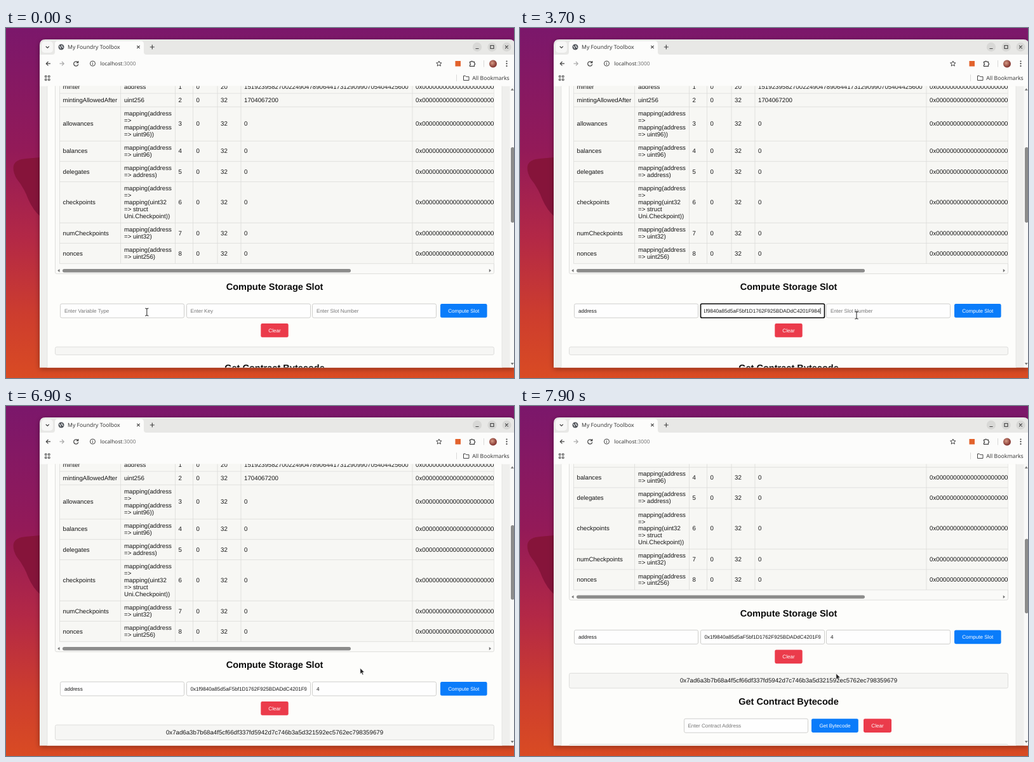
An HTML page that plays this animation: 800 px wide and 552 px high, repeating every 8000 ms.

```html
<!DOCTYPE html>
<html lang="en">
<head>
<meta charset="utf-8">
<title>Compute Storage Slot</title>
<style>
  html, body { margin: 0; width: 100%; height: 100%; overflow: hidden; background: #9c1c52; }
  svg { display: block; width: 800px; height: 552px; }
  text { font-family: "Liberation Sans", Arial, sans-serif; font-size: 9.7px; fill: #161616; white-space: pre; text-rendering: geometricPrecision; }
  .ui { font-family: "Noto Sans", "Open Sans", sans-serif; font-size: 8.7px; fill: #3a3a3a; }
  .head { font-weight: bold; font-size: 14.55px; text-anchor: middle; fill: #0c0c0c; }
  .small { font-size: 8.1px; }
  .hint { fill: #757575; }
  .label { fill: #fff; text-anchor: middle; }
  .mid { text-anchor: middle; }
  .icon { fill: none; stroke: #444; stroke-width: 1.2; }
  .rule { stroke: #dcdcda; stroke-width: .8; }
</style>
</head>
<body>
<svg id="stage" viewBox="0 0 800 552">
  <defs>
    <linearGradient id="desk" x2="0" y2="1">
      <stop offset="0" stop-color="#7b176b"/>
      <stop offset=".35" stop-color="#931a58"/>
      <stop offset=".6" stop-color="#b32846"/>
      <stop offset=".82" stop-color="#cd3d2e"/>
      <stop offset="1" stop-color="#d94b23"/>
    </linearGradient>
    <radialGradient id="photo" cx=".4" cy=".4">
      <stop offset="0" stop-color="#d79a84"/>
      <stop offset="1" stop-color="#8a3f38"/>
    </radialGradient>
    <filter id="shade" x="-10%" y="-10%" width="120%" height="120%">
      <feDropShadow dx="0" dy="2" stdDeviation="4" flood-opacity=".35"/>
    </filter>
    <clipPath id="view"><rect x="53" y="91.5" width="748" height="444"/></clipPath>
    <clipPath id="cells"><rect x="78" y="60" width="690.5" height="330"/></clipPath>
    <clipPath id="keyBox"><rect x="290" y="436" width="183.6" height="20"/></clipPath>
  </defs>

  <rect width="800" height="552" fill="url(#desk)"/>
  <path d="M12 217Q15 207 32 206L54 204V297Q43 288 35 270Q28 251 17 238Q10 226 12 217Z" fill="#86143a"/>

  <!-- browser window -->
  <path d="M53 535V27Q53 18 62 18H793Q801 18 801 26V535.5H53Z" fill="#e8e8e6" filter="url(#shade)"/>
  <rect x="56" y="21" width="18" height="18" rx="5" fill="#f7f7f6"/>
  <path d="M62.8 29L65.3 31.5L67.8 29" class="icon"/>
  <path d="M73 42Q77 42 77 38V25Q77 20.500 81.500 20.500H212Q217 20.500 217 25V38Q217 42 221 42H801V92H53V42Z" fill="#fcfcfb"/>
  <circle cx="87" cy="30" r="4.500" fill="#50545a"/>
  <path d="M84 28.500Q86 30 86 32.500M88 27Q87 29.500 90 31" stroke="#fff" stroke-width="1.100" fill="none"/>
  <text x="97" y="33.200" class="ui">My Foundry Toolbox</text>
  <path d="M206.300 27.800L210.700 32.200M210.700 27.800L206.300 32.200M226.800 30H233.800M230.300 26.500V33.500" class="icon"/>
  <g fill="#d8d8d6"><circle cx="742" cy="30" r="7.200"/><circle cx="765.500" cy="30" r="7.200"/><circle cx="788.500" cy="30" r="7.200"/></g>
  <path d="M739.500 32.500H744.500M763 27.500H768V32.500H763ZM786.200 27.700L790.800 32.300M790.800 27.700L786.200 32.300" class="icon"/>
  <path d="M70 56.200H63.300M66.500 53L63.300 56.200L66.500 59.400" class="icon"/>
  <path d="M84.500 56.200H91.200M88 53L91.200 56.200L88 59.400" class="icon" style="stroke:#aaa"/>
  <path d="M113 54A3.600 3.600 0 1 0 113.800 57.200M113.800 52V54.800H111" class="icon"/>
  <circle cx="136.500" cy="56" r="4" class="icon" style="stroke-width:1"/>
  <path d="M136.500 55.500V58.300M136.500 53.600V54.600" class="icon" style="stroke-width:1"/>
  <text x="148.300" y="59.200" class="ui" style="font-size:8.300px">localhost<tspan fill="#777">:3000</tspan></text>
  <path d="M681.800 52L683 54.800L686 55L683.700 57L684.400 60L681.800 58.400L679.200 60L679.900 57L677.600 55L680.600 54.800Z" class="icon" style="stroke-width:1"/>
  <rect x="707.500" y="52" width="8.500" height="8.500" fill="#e2622c"/>
  <path d="M730.500 53.300H732.500Q733.500 50.800 735 53.300H737.500V55.500Q740 56.500 737.500 58V60.300H730.500V58Q733 57 730.500 55.500Z" class="icon"/>
  <path d="M752.500 51V61.500M709.500 73.500V84" stroke="#d9d9d8"/>
  <circle cx="767" cy="56.500" r="6" fill="url(#photo)"/>
  <g fill="#444"><circle cx="788.500" cy="52.500" r="1.100"/><circle cx="788.500" cy="56.200" r="1.100"/><circle cx="788.500" cy="59.900" r="1.100"/></g>
  <path d="M61.500 75.200H64V77.700H61.500ZM66.500 75.200H69V77.700H66.500ZM61.500 80.200H64V82.700H61.500ZM66.500 80.200H69V82.700H66.500Z" class="icon" style="stroke-width:1"/>
  <path d="M720.500 82.500V75.500H723.500L724.700 76.800H729V82.500Z" class="icon" style="stroke-width:1"/>
  <text x="734.300" y="82" class="ui">All Bookmarks</text>

  <!-- page -->
  <g clip-path="url(#view)">
    <rect x="53" y="91.500" width="748" height="444" fill="#efefed"/>
    <rect x="65" y="80" width="716" height="470" fill="#fdfdfb" stroke="#e6e6e4" stroke-width="1"/>
    <g id="page"></g>
    <rect x="793.500" y="91.500" width="8" height="444" fill="#f9f9f8"/>
    <rect id="thumb" x="795" width="5.500" rx="2.700" fill="#8c8c8b"/>
    <path d="M794.800 98.500L797.300 95L799.800 98.500ZM794.800 528L797.300 531.500L799.800 528Z" fill="#777"/>
  </g>

  <g id="pointer">
    <path data-kind="beam" d="M-2.600 -5.800Q0 -5.800 0 -4.600Q0 -5.800 2.600 -5.800M0 -4.600V4.600M-2.600 5.800Q0 5.800 0 4.600Q0 5.800 2.600 5.800" fill="none" stroke="#444" stroke-width="1.200"/>
    <path data-kind="arrow" d="M0 0V9.200L2.100 7.300L3.600 10.700L5.200 10L3.700 6.700L6.600 6.500Z" fill="#222" stroke="#fff" stroke-width=".6"/>
    <path data-kind="hand" d="M-1 -5Q0 -6 1 -5V-1L4.500 0Q5.500 .5 5 2.500L4 6H-1.500L-4.500 2Q-4.500 .3 -3 1L-1 2.500Z" fill="#222" stroke="#fff" stroke-width=".7"/>
  </g>
</svg>

<script>
const NS = "http://www.w3.org/2000/svg";
const $ = id => document.getElementById(id);
const page = $("page");

function add(parent, tag, attrs, content) {
  const el = document.createElementNS(NS, tag);
  for (const k in attrs) el.setAttribute(k, attrs[k]);
  if (content !== undefined) el.textContent = content;
  parent.append(el);
  return el;
}
const box = (parent, x, y, w, h, fill, stroke = "none", rx = 2.4) =>
  add(parent, "rect", { x, y, width: w, height: h, fill, stroke, rx, "stroke-width": 1 });
const write = (parent, x, y, str, cls = "") => add(parent, "text", { x, y, class: cls }, str);
const field = (parent, x, y) => box(parent, x + .5, y, 195, 22, "#fefefe", "#cfcfcd");
function button(parent, x, y, w, fill, str) {
  const el = box(parent, x, y, w, 21.8, fill);
  write(parent, x + w / 2, y + 13.8, str, "small label");
  return el;
}

// storage layout table
const BLUE = "#0a7cfa", BLUE_HOVER = "#0062cc", RED = "#eb3b4b";
const LINE = 10.91, PAD = 10.3, BOTTOM = 371.6;
const cols = [84.5, 180.5, 266.5, 294.5, 333, 370, 640];
const rows = [
  ["minter", "address", 20, "151923958270022490478906441731290990705404425600"],
  ["mintingAllowedAfter", "uint256", 32, "1704067200"],
  ["allowances", "mapping(address|=>|mapping(address|=> uint96))"],
  ["balances", "mapping(address|=> uint96)"],
  ["delegates", "mapping(address|=> address)"],
  ["checkpoints", "mapping(address|=>|mapping(uint32|=> struct|Uni.Checkpoint))"],
  ["numCheckpoints", "mapping(address|=> uint32)"],
  ["nonces", "mapping(address|=> uint256)"]
];
box(page, 77.5, 60, 691, 327.6, "#fafaf8", "#dededc");
const table = add(page, "g", { "clip-path": "url(#cells)" });
box(table, 84.5, 60, 700, BOTTOM - 60, "#f7f7f4", "none", 0);
let bottom = BOTTOM;
for (let i = rows.length - 1; i >= 0; i--) {
  const [name, type, bytes = 32, value = "0"] = rows[i];
  const lines = type.split("|");
  const h = lines.length * LINE + PAD, mid = bottom - h / 2, base = mid + 3.1;
  add(table, "path", { d: `M84.5 ${bottom}H790`, class: "rule" });
  lines.forEach((s, n) => write(table, 186, base + (n - (lines.length - 1) / 2) * LINE, s));
  [name, null, i + 1, 0, bytes, value, "0x" + "0".repeat(40)].forEach((s, c) => {
    if (s !== null) write(table, cols[c] + 5.1, base, s);
  });
  bottom -= h;
}
add(table, "path", { d: cols.map(x => `M${x} 60V${BOTTOM}`).join(""), class: "rule" });
box(page, 89, 380, 454, 5.4, "#8c8c8b", "none", 2.7);
add(page, "path", { d: "M84.500 380L81.200 382.600L84.500 385.200ZM760.800 380L764 382.600L760.800 385.200Z", fill: "#777" });

// slot form
write(page, 423, 413.3, "Compute Storage Slot", "head");
const fieldX = [85, 284, 482];
fieldX.forEach(x => field(page, x, 435));
const hints = ["Enter Variable Type", "Enter Key", "Enter Slot Number"];
const inputs = hints.map((s, i) =>
  write(i === 1 ? add(page, "g", { "clip-path": "url(#keyBox)" }) : page, fieldX[i] + 6.9, 448.8, s, "small hint"));
const ring = add(page, "rect", { y: 435, width: 195, height: 22, rx: 2, fill: "none", stroke: "#111", "stroke-width": 1.7 });
const caret = add(page, "rect", { y: 441.5, width: .9, height: 9.4, fill: "#111" });
const compute = button(page, 684, 435, 73.6, BLUE, "Compute Slot");
button(page, 401.3, 466, 43.4, RED, "Clear");
const result = box(page, 77.5, 503, 691, 12.4, "#f6f6f4", "#dededc");
const hash = write(page, 423, 517.8, "0x7ad6a3b7b68a4f5cf66df337fd5942d7c746b3a5d321592ec5762ec798359679", "mid");

// bytecode form
const lower = add(page, "g", {});
write(lower, 423, 552.700, "Get Contract Bytecode", "head");
field(lower, 258, 574.8);
write(lower, 264.4, 588.6, "Enter Contract Address", "small hint");
button(lower, 459, 574.8, 73.8, BLUE, "Get Bytecode");
button(lower, 541, 574.8, 44, RED, "Clear");
box(lower, 77.5, 615, 691, 12.4, "#f6f6f4", "#dededc");

// timelines: each entry holds until the next one
const KEY = "0x1f9840a85d5aF5bf1D1762F925BDADdC4201F984";
const typed = [[0, ""], [1500, "a"], [1600, "ad"], [1700, "add"], [1800, "addr"], [2000, "addre"], [2200, "addres"], [2300, "address"]];
const focus = [[0, -1], [400, 0], [3300, 1], [4000, 2], [6200, -1]];
const blink = [[0, 0], [400, 1], [1000, 0], [1500, 1], [2800, 0], [3300, 1], [4600, 0], [4900, 1], [5400, 0], [5900, 1], [6200, 0]];
const scroll = [[0, 0], [7100, 25], [7200, 65.6], [7300, 81.6]];
const moves = [
  [0, 221.8, 448, "beam"], [100, 221.3, 448, "beam"],
  [2700, 245, 446, "beam"], [2800, 288, 443, "beam"], [2900, 326, 441, "beam"], [3000, 342.6, 441, "beam"],
  [3200, 343, 443, "beam"], [3600, 425, 447, "beam"], [3700, 530, 453, "beam"], [3900, 562.5, 455.5, "beam"],
  [5100, 562.5, 456.5, "beam"], [5400, 588, 455, "beam"], [5500, 630, 453, "beam"],
  [5700, 664, 451, "beam"], [5800, 696, 449, "hand"], [5900, 712, 448, "hand"],
  [6700, 672, 436, "arrow"], [6800, 590, 420, "arrow"], [6900, 557.8, 413.4, "arrow"],
  [7500, 551, 415, "arrow"], [7600, 532, 418, "arrow"], [7700, 513, 420, "arrow"], [7800, 502, 421.500, "arrow"], [7900, 497.8, 422, "arrow"]
];
const at = (list, t) => list.findLast(e => e[0] <= t);

function setInput(i, value) {
  const str = value || hints[i];
  if (inputs[i].textContent !== str) inputs[i].textContent = str;
  inputs[i].setAttribute("class", value ? "small" : "small hint");
}

function draw(t) {
  const active = at(focus, t)[1];
  const values = [at(typed, t)[1], t >= 3400 ? KEY : "", t >= 4900 ? "4" : ""];
  values.forEach((v, i) => setInput(i, v));

  // a focused long value shows its end
  const atEnd = active === 1 && values[1];
  inputs[1].setAttribute("x", atEnd ? 472.4 : 290.5);
  inputs[1].setAttribute("text-anchor", atEnd ? "end" : "start");

  ring.setAttribute("visibility", active < 0 ? "hidden" : "visible");
  caret.setAttribute("visibility", at(blink, t)[1] ? "visible" : "hidden");
  if (active >= 0) {
    ring.setAttribute("x", fieldX[active] + .5);
    const w = values[active] ? inputs[active].getComputedTextLength() : 0;
    caret.setAttribute("x", atEnd ? 472.6 : fieldX[active] + 6.9 + w);
  }

  const done = t >= 6400;
  result.setAttribute("height", done ? 23.6 : 12.4);
  hash.setAttribute("visibility", done ? "visible" : "hidden");
  lower.setAttribute("transform", `translate(0 ${done ? 0 : -11.4})`);

  const dy = at(scroll, t)[1];
  page.setAttribute("transform", `translate(0 ${-dy})`);
  $("thumb").setAttribute("y", 188 + dy * .262);
  $("thumb").setAttribute("height", done ? 117.5 : 119);

  const [, x, y, kind] = at(moves, t);
  compute.setAttribute("fill", kind === "hand" ? BLUE_HOVER : BLUE);
  $("pointer").setAttribute("transform", `translate(${x} ${y})`);
  for (const p of $("pointer").children)
    p.setAttribute("visibility", p.dataset.kind === kind ? "visible" : "hidden");
}

const start = performance.now();
function tick() {
  draw((performance.now() - start) % 8000);
  requestAnimationFrame(tick);
}
tick();
</script>
</body>
</html>
```
